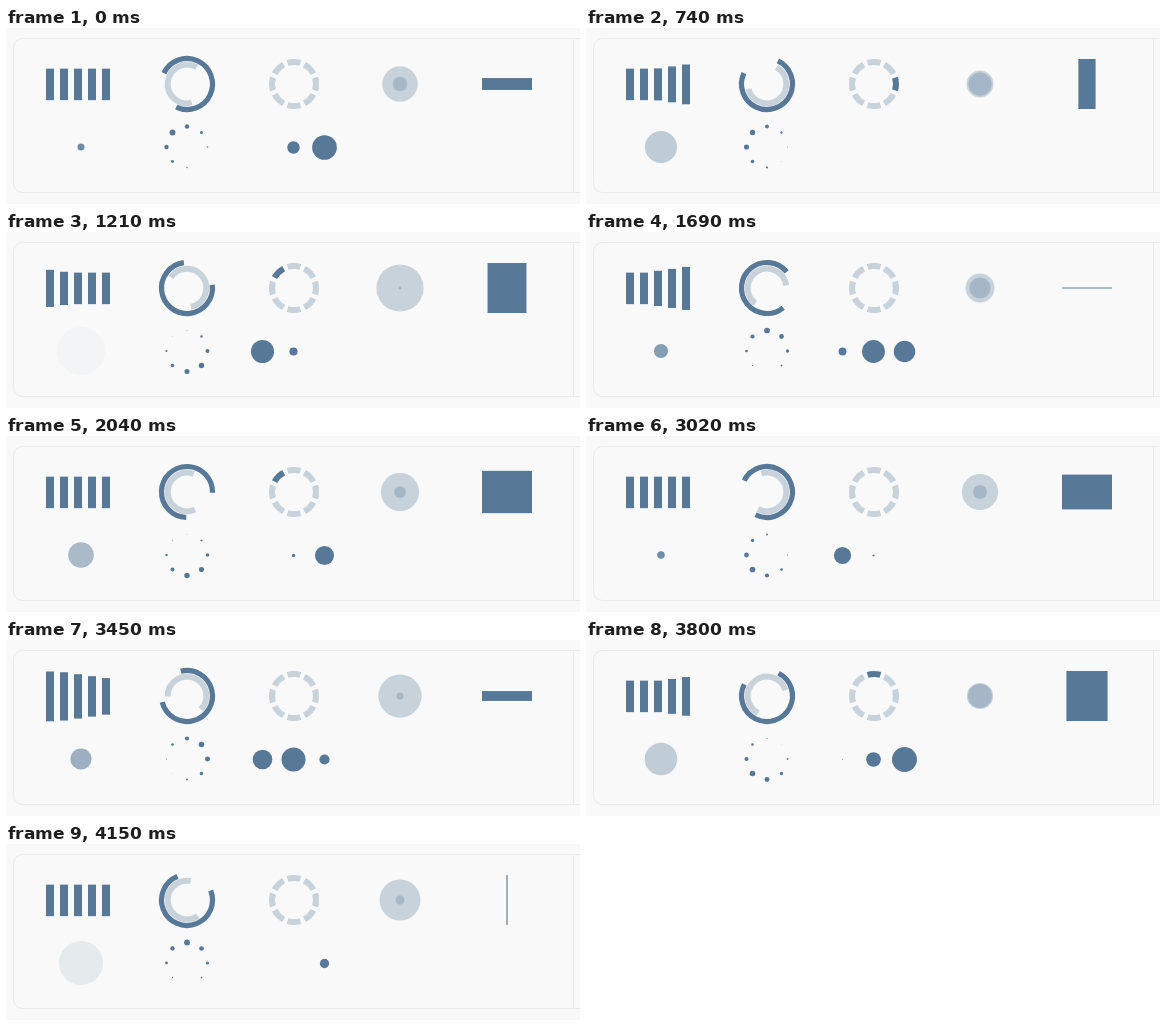
An HTML page for the animation above (4.22 s loop, 574 by 176 pixels).

```html
<!DOCTYPE html>
<html lang="en">
<head>
<meta charset="utf-8">
<title>Loading spinners</title>
<style>
  html, body { margin: 0; width: 100%; height: 100%; overflow: hidden; background: #f9f9f9; }
  svg { display: block; }
</style>
</head>
<body>
<svg id="stage" width="574" height="176" viewBox="0 0 574 176">
  <path d="M580 10.5H16.5a9 9 0 0 0-9 9V155.5a9 9 0 0 0 9 9H580M567.5 10.5V164.5" fill="none" stroke="#ebebeb"/>
</svg>
<script>
const COLOR = '#577896';
const LOOP = 4220;
const stage = document.getElementById('stage');

function set(el, attrs) {
  for (const name in attrs) el.setAttribute(name, attrs[name]);
  return el;
}

function add(tag, attrs) {
  const el = document.createElementNS('http://www.w3.org/2000/svg', tag);
  return stage.appendChild(set(el, attrs));
}

const repeat = (count, make) => Array.from({ length: count }, (_, i) => make(i));
const mod = (a, n) => ((a % n) + n) % n;

// Arc centred on angle 0 (degrees, clockwise from the right).
function arc(cx, cy, r, sweep, width, opacity = 1) {
  const half = sweep * Math.PI / 360;
  const x = cx + r * Math.cos(half), dy = r * Math.sin(half);
  const d = `M${x} ${cy - dy}A${r} ${r} 0 ${+(sweep > 180)} 1 ${x} ${cy + dy}`;
  return add('path', { d, fill: 'none', stroke: COLOR, 'stroke-width': width, 'stroke-opacity': opacity });
}

const dot = (cx, cy, opacity = 1) => add('circle', { cx, cy, r: 0, fill: COLOR, 'fill-opacity': opacity });
const turn = (el, angle, cx, cy) => set(el, { transform: `rotate(${angle} ${cx} ${cy})` });

const bars = repeat(5, i => add('rect', { x: 40 + 14 * i, width: 8, fill: COLOR }));
const innerRing = arc(181, 56, 19.3, 225, 6, 0.3);
const outerRing = arc(181, 56, 25.5, 270, 5.2);
const segments = repeat(8, i => turn(arc(288, 56, 22, 34, 6), i * 45, 288, 56));
const bounces = repeat(2, () => dot(394, 56, 0.3));
const plane = add('rect', { fill: COLOR });
const pulse = dot(75, 119);
const orbit = repeat(8, i => {
  const a = (i - 2) * Math.PI / 4;
  return dot(181 + 20.5 * Math.cos(a), 119 + 20.5 * Math.sin(a));
});
const trio = repeat(3, i => dot(256.5 + 31 * i, 119.5));

function drawBars(t) {
  bars.forEach((bar, i) => {
    const distance = Math.abs(mod(t - 0.05 * i, 1) - 0.41);
    const height = 31.5 + 19.5 * Math.max(0, 1 - distance / 0.25);
    set(bar, { y: 56.4 - height / 2, height });
  });
}

function drawRings(t) {
  turn(outerRing, 340 + 120 * t, 181, 56);
  turn(innerRing, 188 - 180 * t, 181, 56);
}

function drawSegments(t) {
  const slot = mod(t, 0.8) * 10;
  const lit = slot % 1 > 0.3 && slot % 1 < 0.95 ? (Math.floor(slot) + 1) % 8 : -1;
  segments.forEach((s, i) => set(s, { 'stroke-opacity': i === lit ? 1 : 0.3 }));
}

function drawBounces(t) {
  const scale = Math.abs(mod(t / 2 - 0.145 + 0.5, 1) - 0.5) * 2;
  set(bounces[0], { r: 25 * scale });
  set(bounces[1], { r: 25 * (1 - scale) });
}

// The square flips about one axis, then about the other.
function drawPlane(t) {
  const phase = mod(t / 1.6 - 0.315, 1);
  const p = phase % 0.5;
  const fold = p < 0.265 ? 1 - p / 0.265 : (p - 0.265) / 0.235;
  const size = 50 * fold ** 1.2;
  const width = phase < 0.5 ? size : 50;
  const height = phase < 0.5 ? 50 : size;
  set(plane, { x: 501 - width / 2, y: 56 - height / 2, width, height });
}

function drawPulse(t) {
  const p = mod(t / 1.5 + 0.14, 1);
  set(pulse, { r: 25 * p, 'fill-opacity': 1 - p });
}

function drawOrbit(t) {
  orbit.forEach((el, i) => {
    const distance = Math.abs(mod(i - 7.05 - 10 * t + 4, 8) - 4);
    set(el, { r: 3 * (1 - distance / 4) });
  });
}

function drawTrio(t) {
  trio.forEach((el, i) => {
    const distance = Math.abs(mod(t - 1.34 - 0.26 * i + 0.95, 1.9) - 0.95);
    const r = distance < 0.6 ? 6.25 * (1 + Math.cos(Math.PI * distance / 0.6)) : 0;
    set(el, { r });
  });
}

// Motion advances in even steps, held for slightly uneven times.
const groupStarts = [70, 600, 1140, 1690, 2250, 2810, 3380, 3940, 4500];
const STEP = 0.0685;

function steppedTime(ms) {
  if (ms < groupStarts[0]) return 0;
  const g = groupStarts.findIndex((start, i) => ms >= start && ms < groupStarts[i + 1]);
  const hold = (groupStarts[g + 1] - groupStarts[g]) / 8;
  const within = Math.min(7, Math.floor((ms - groupStarts[g] + 5) / hold));
  return (1 + 8 * g + within) * STEP;
}

const scenes = [drawBars, drawRings, drawSegments, drawBounces, drawPlane, drawPulse, drawOrbit, drawTrio];

function render(ms) {
  const t = steppedTime(ms % LOOP);
  scenes.forEach(draw => draw(t));
}

const begin = performance.now();
function tick() {
  render(performance.now() - begin);
  requestAnimationFrame(tick);
}
tick();
</script>
</body>
</html>
```
